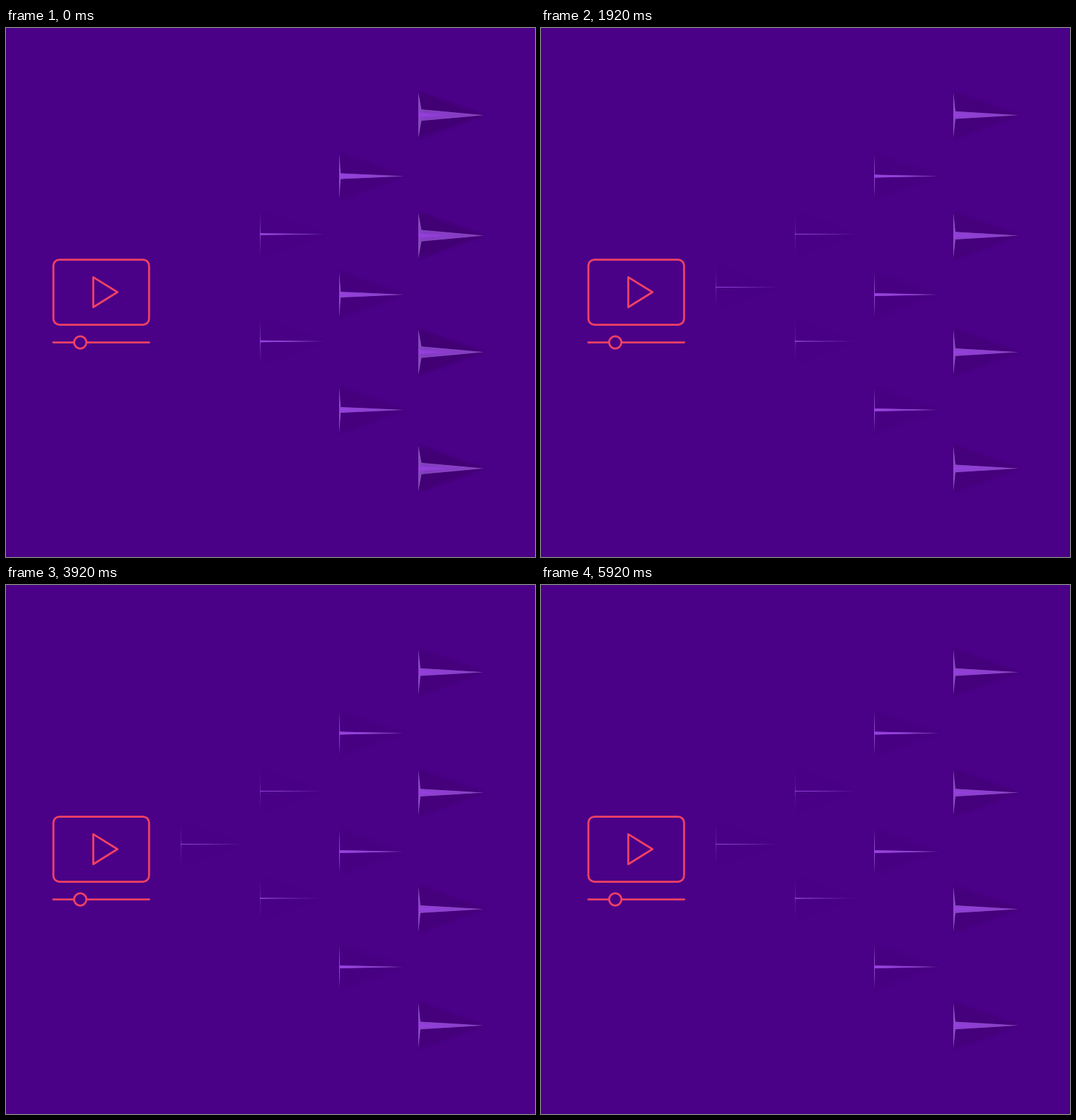
An HTML page with a canvas for the animation above (6000 ms loop, 748 px wide and 748 px high).

```html
<!DOCTYPE html>
<html lang="en">
<head>
<meta charset="utf-8">
<title>Video spikes</title>
<style>
html, body { margin: 0; width: 100%; height: 100%; overflow: hidden; background: #4b0088; }
canvas { display: block; width: 748px; height: 748px; }
</style>
</head>
<body>
<canvas id="stage" width="748" height="748"></canvas>
<script>
const ctx = document.getElementById('stage').getContext('2d');
const PERIOD = 2000, STEP = 80, EASE = 800, LAG = 120;
const LENGTH = 93, HALF = 32;

// One entry per column, left to right.
const columns = [
  { x: 247, ys: [366.5] },
  { x: 359.2, ys: [291.5, 443] },
  { x: 471, ys: [209.5, 377, 540] },
  { x: 583, ys: [123.2, 293.6, 458.3, 622.8] }
];

const wrap = t => ((t % PERIOD) + PERIOD) % PERIOD;
const smooth = x => {
  x = Math.min(1, Math.max(0, x));
  return x * x * (3 - 2 * x);
};

// Openness of a column: rises, rests, then closes; right columns lead.
function openness(time, column) {
  const t = wrap(time + LAG * column);
  if (t < 40 || t >= 1960) return 0;
  const s = t < 1000 ? smooth(t / EASE) : smooth((1910 - t) / EASE);
  return Math.max(0.03, s);
}

function polygon(points) {
  ctx.beginPath();
  points.forEach(([x, y]) => ctx.lineTo(x, y));
  ctx.closePath();
}

function fade(gradient, color, from, to) {
  gradient.addColorStop(0, `rgba(${color},${from})`);
  gradient.addColorStop(1, `rgba(${color},${to})`);
  return gradient;
}

function shadow(s) {
  const grow = (1 - s) * 3;
  ctx.save();
  ctx.globalAlpha = Math.min(1, s * 1.05);
  ctx.filter = `blur(${1.5 + (1 - s)}px)`;
  polygon([[0, -HALF - grow], [LENGTH + grow, 0], [0, HALF + grow]]);
  ctx.fillStyle = '#36005c';
  ctx.beginPath();
  ctx.rect(-1, -60, 130, 120);
  ctx.clip();
  polygon([[0, -HALF - grow], [LENGTH + grow, 0], [0, HALF + grow]]);
  ctx.fill();
  ctx.restore();
}

function body(s) {
  const nx = 10.5 * s, ny = 19 * s;
  const shape = [[0, -HALF], [nx, -ny], [LENGTH, 0], [nx, ny], [0, HALF]];
  ctx.save();
  polygon(shape);
  ctx.clip();

  polygon(shape);
  ctx.fillStyle = '#58287f';
  ctx.fill();
  ctx.fillStyle = `rgba(145,64,212,${(1 - s) * 0.85})`;
  ctx.fill();

  // Soft light along the left side and the sloping edges.
  ctx.fillStyle = fade(ctx.createLinearGradient(0, 0, 9, 0), '140,80,195', 0.65, 0);
  ctx.fillRect(0, -HALF, 9, HALF * 2);
  ctx.lineWidth = 5;
  ctx.strokeStyle = 'rgba(150,95,200,.22)';
  ctx.stroke();
  ctx.lineWidth = 2;
  ctx.stroke();

  // Bright core on the axis.
  ctx.save();
  ctx.translate(5, 0);
  ctx.scale(80 + (1 - s) * 40, 8.5);
  const glow = ctx.createRadialGradient(0, 0, 0, 0, 0, 1);
  glow.addColorStop(0, 'rgba(152,64,226,1)');
  glow.addColorStop(0.35, 'rgba(148,64,220,.65)');
  glow.addColorStop(1, 'rgba(140,64,210,0)');
  ctx.fillStyle = glow;
  ctx.fillRect(-1, -1, 2, 2);
  ctx.restore();
  ctx.restore();
}

function player() {
  ctx.lineWidth = 2.8;
  ctx.lineCap = ctx.lineJoin = 'round';
  ctx.strokeStyle = '#f04163';
  ctx.beginPath();
  ctx.roundRect(67, 327.6, 135.3, 92, 8.5);
  ctx.stroke();
  polygon([[123.4, 352.4], [157.6, 373.5], [123.4, 394.7]]);
  ctx.stroke();
  ctx.beginPath();
  ctx.moveTo(66.8, 444.6);
  ctx.lineTo(96, 444.6);
  ctx.moveTo(114, 444.6);
  ctx.lineTo(202.5, 444.6);
  ctx.moveTo(113.7, 444.6);
  ctx.arc(105, 444.6, 8.7, 0, Math.PI * 2);
  ctx.stroke();
}

function draw(time) {
  ctx.fillStyle = '#4b0088';
  ctx.fillRect(0, 0, 748, 748);
  player();
  columns.forEach(({ x, ys }, i) => {
    const s = openness(time, i);
    if (!s) return;
    ys.forEach(y => {
      ctx.save();
      ctx.translate(x, y);
      shadow(s);
      body(s);
      ctx.restore();
    });
  });
}

const start = performance.now();
let shown = -1;
function tick() {
  const step = Math.floor((performance.now() - start) / STEP);
  if (step !== shown) {
    shown = step;
    draw(step * STEP);
  }
  requestAnimationFrame(tick);
}
tick();
</script>
</body>
</html>
```
